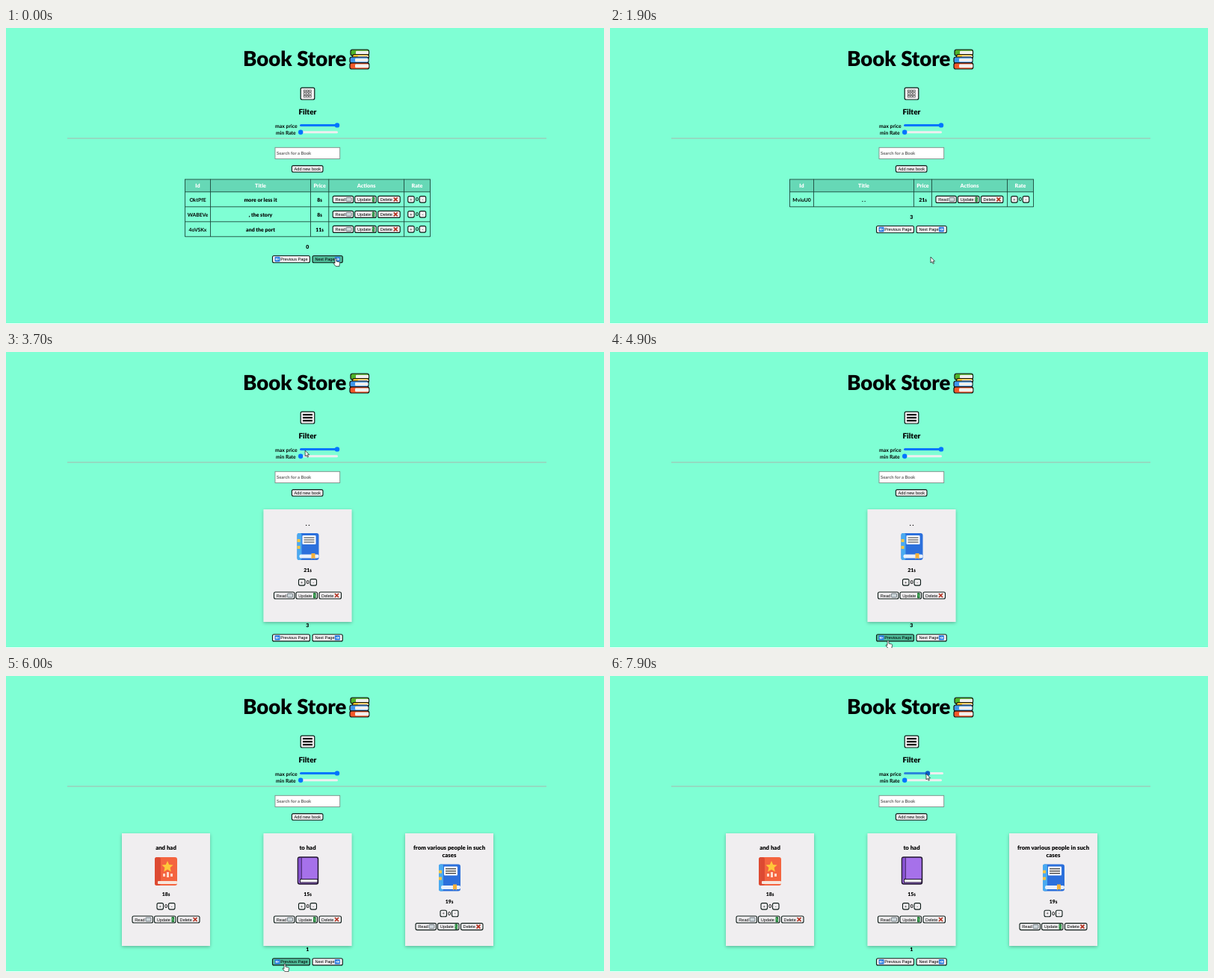
An HTML page for the animation above (8 s loop, 800 px wide and 397 px high).

```html
<!DOCTYPE html>
<html lang="en">
<head>
<meta charset="utf-8">
<title>Book Store</title>
<style>
  html, body { margin: 0; width: 100%; height: 100%; overflow: hidden; background: #7fffd4; }
  svg { display: block; width: 800px; height: 397px; }
  text { font-family: Lato, "Open Sans", sans-serif; font-weight: 700; white-space: pre; text-rendering: geometricPrecision; }
  .ui { font-family: "Liberation Sans", Arial, sans-serif; font-weight: 400; }
  .heavy { font-weight: 900; }
</style>
</head>
<body>
<svg id="stage" viewBox="0 0 800 397" xmlns="http://www.w3.org/2000/svg">
  <defs>
    <filter id="shadow" x="-10%" y="-10%" width="120%" height="120%">
      <feDropShadow dx="0" dy="1.5" stdDeviation="2" flood-opacity=".28"/>
    </filter>
  </defs>
  <g id="page"></g>
  <g id="cursor"></g>
</svg>
<script>
const LOOP = 8000;
const pageLayer = document.getElementById('page');
const cursorLayer = document.getElementById('cursor');

// id, title lines, price, cover
const books = [
  [['OktPfE', ['more or less it'], 8, 'red'], ['WABEVe', [', the story'], 8, 'purple'], ['4oVSKx', ['and the port'], 11, 'blue']],
  [['Tq8LnB', ['and had'], 18, 'red'], ['hX2mRd', ['to had'], 15, 'purple'], ['Jc6YvA', ['from various people in such', 'cases'], 19, 'blue']],
  [['R9Pbzw', ['was more or less'], 16, 'blue'], ['VgE7ej', ['to a dead channel'], 25, 'red'], ['D5sWEC', [', the story'], 8, 'purple']],
  [['MviuU0', ['. .'], 21, 'blue']]
];

// time, page, card view
const views = [[0, 0, 0], [400, 1, 0], [800, 2, 0], [1900, 3, 0], [3300, 3, 1], [5100, 2, 1], [6000, 1, 1]];
// time, x, y
const path = [
  [0, 440, 309], [900, 440, 309], [1150, 434, 267], [1200, 434, 267], [1400, 428, 304],
  [1600, 428, 305], [1700, 429, 307], [2000, 429, 307], [2750, 404, 100], [2900, 405, 86],
  [3500, 405, 86], [4300, 374, 380], [4500, 371, 387], [5200, 371, 387], [5500, 372, 386],
  [6600, 372, 386], [7350, 442, 132], [7500, 442, 131], [7900, 423, 131], [8000, 423, 131]
];

const rect = (x, y, w, h, fill, extra = '') =>
  `<rect x="${x}" y="${y}" width="${w}" height="${h}" fill="${fill}" ${extra}/>`;
const shape = (d, fill, extra = '') => `<path d="${d}" fill="${fill}" ${extra}/>`;
const stroke = (d, color, w = 1) => shape(d, 'none', `stroke="${color}" stroke-width="${w}"`);
const text = (x, y, s, size, { anchor = 'middle', fill = '#000', cls = '' } = {}) =>
  `<text x="${x}" y="${y}" font-size="${size}" text-anchor="${anchor}" fill="${fill}" class="${cls}">${s}</text>`;
const move = (x, y, body) => `<g transform="translate(${x} ${y})">${body}</g>`;
const label = (x, y, s) => text(x, y, s, 5.6, { anchor: 'start', cls: 'ui' });
const cost = (x, y, price) => text(x, y, price + '<tspan font-size="4.6">$</tspan>', 6.9, { cls: 'heavy' });
const box = (x, y, w, h, hot) =>
  rect(x, y, w, h, hot ? '#4fba98' : '#f0eef0', 'rx="2" stroke="#0c1a16" stroke-width="1.1"');

const inside = (p, x, y, w, h) => p.x >= x && p.x <= x + w && p.y >= y && p.y <= y + h;

function bookStack() {
  const layer = (x, y, w, h, color) =>
    rect(x, y, w, h, color, 'rx="2.5" stroke="#111" stroke-width="1.2"') +
    rect(x + 7, y + 1.7, w - 7.5, h - 3.4, '#f1f0ee', 'rx="1.2"');
  return layer(461, 29, 24.5, 8, '#4fb32a') + layer(463.5, 35.5, 22, 5.5, '#f8c32c') +
    layer(460, 39, 25, 8, '#3f97ec') + layer(460, 46.8, 25.8, 8.2, '#f4592a');
}

function cover(kind) {
  if (kind === 'red') {
    return rect(-15, 1, 30, 38, '#f4643f', 'rx="3"') + rect(-15, 1, 8, 38, '#dd4a32', 'rx="3"') +
      rect(-11, 33, 26, 4, '#f7e6dc', 'rx="1"') +
      shape('M2 6l2.2 5 5.4.5-4 3.6 1.2 5.3-4.8-2.8-4.8 2.8 1.2-5.3-4-3.6 5.4-.5z', '#ffc83a') +
      rect(-4, 23, 3, 4, '#ffd9c9') + rect(1, 21, 3, 7, '#ffd9c9') + rect(6, 23, 3, 4, '#ffd9c9');
  }
  if (kind === 'purple') {
    return rect(-13, 1, 27, 36, '#a671ea', 'rx="2.5" stroke="#20152e" stroke-width="1.5"') +
      rect(-12.3, 2, 4, 28, '#8551ce') + stroke('M-8 1.5V30', '#3a2356', .8) +
      rect(-10, 30.5, 23.4, 4.5, '#f4f0f6', 'stroke="#20152e" stroke-width="1"');
  }
  return rect(-14, 1, 29, 36, '#2c70dc', 'rx="3"') + rect(-14, 1, 6, 36, '#4aaaf0', 'rx="2"') +
    rect(-14, 9, 4, 4, '#f6c544') + rect(-14, 18, 4, 4, '#f6c544') +
    rect(-7, 4, 18, 12, '#fff', 'rx="1"') + stroke('M-5 7H9M-5 10H9M-5 13H9', '#333', 1.1) +
    rect(-11, 29.5, 26, 5, '#e9f1fc', 'rx="2"') + shape('M5 28h5v8l-2.5-2-2.5 2z', '#f6b13c');
}

function actions(x, y) {
  return box(x, y, 27.5, 9, 0) + label(x + 3.3, y + 6.6, 'Read') +
    rect(x + 18, y + 2, 7, 5, '#cfd8dc', 'rx=".6" stroke="#48545c" stroke-width=".7"') +
    box(x + 29.5, y, 28.5, 9, 0) + label(x + 32.8, y + 6.6, 'Update') +
    rect(x + 52.5, y + 1, 3.6, 7.2, '#17712f', 'rx="1"') +
    stroke(`M${x + 55.3} ${y + 2.8}h-2v1.7h2v1.8h-2`, '#7fe08c', .6) +
    box(x + 60.5, y, 29.5, 9, 0) + label(x + 63.6, y + 6.6, 'Delete') +
    stroke(`M${x + 81.5} ${y + 2}l5 5m0-5l-5 5`, '#b5301f', 1.7);
}

function rate(x, y) {
  return box(x, y, 8.5, 8.5, 0) + text(x + 4.25, y + 6.2, '+', 5.6, { cls: 'ui' }) +
    text(x + 12.2, y + 6.7, '0', 6.6) +
    box(x + 15.5, y, 8.5, 8.5, 0) + text(x + 19.75, y + 5.9, '-', 5.6, { cls: 'ui' });
}

function pager(n, y, p) {
  const arrow = (x, dir) => rect(x, y + 1.3, 7, 6.6, '#2f7fe0', 'rx=".8"') +
    stroke(`M${x + 1.3} ${y + 4.6}h4.4`, '#fff', 1) +
    stroke(`M${x + 3.5 + dir * .4} ${y + 2.9}l${dir * 1.7} 1.7l${-dir * 1.7} 1.7`, '#fff', .8);
  return text(403.3, y - 10, n, 7, { cls: 'heavy' }) +
    box(356.5, y, 50, 9.2, inside(p, 356, y, 51, 9.5)) + arrow(359.6, -1) + label(367.2, y + 6.7, 'Previous Page') +
    box(410, y, 40.3, 9.2, inside(p, 410, y, 41, 9.5)) + label(413.4, y + 6.7, 'Next Page') + arrow(439.8, 1);
}

function table(n, p) {
  const rows = books[n], small = rows.length === 1;
  const cols = small ? [240.5, 272.5, 406.5, 430.5, 531.5, 566.5] : [239.5, 273.5, 407.5, 431.8, 532.5, 567.5];
  const mid = cols.slice(1).map((c, i) => (c + cols[i]) / 2);
  const left = cols[0], width = cols[5] - left, bottom = 220 + rows.length * 20;
  let out = rect(left, 203, width, 17, '#66d8b6');
  ['Id', 'Title', 'Price', 'Actions', 'Rate'].forEach((s, i) =>
    out += text(mid[i], 214.2, s, 7.2, { fill: '#fff', cls: 'heavy' }));
  rows.forEach(([id, title, price], i) => {
    const y = 220 + i * 20;
    for (let c = 0; c < 5; c++) {
      if (inside(p, cols[c], y, cols[c + 1] - cols[c], 20)) out += rect(cols[c], y, cols[c + 1] - cols[c], 20, '#e6e4e6');
    }
    out += text(mid[0], y + 12.5, id, 6.8) + text(mid[1], y + 12.5, title.join(' '), 7, { cls: 'heavy' }) +
      cost(mid[2], y + 12.5, price) + actions(cols[3] + 5.4, y + 5.4) + rate(cols[4] + 5.2, y + 5.6);
  });
  let lines = cols.map(x => `M${x} 202.7V${bottom}`).join('') + `M${left} 203H${cols[5]}`;
  for (let y = 220; y <= bottom; y += 20) lines += `M${left} ${y - .2}H${cols[5]}`;
  return out + stroke(lines, '#1d4a3d', .9) + pager(n, bottom + 25.5, p);
}

function card(x, [, title, price, kind]) {
  const dy = (title.length - 1) * 9.6;
  let out = rect(-59, 211, 118, 151, '#f0eef0', 'filter="url(#shadow)"');
  title.forEach((s, i) => out += text(0, 232.8 + i * 9.8, s, 7.8, { cls: 'heavy' }));
  out += move(0, dy, move(0, 242, cover(kind)) + cost(0, 295.3, price) + rate(-12, 304.6) + actions(-45, 322));
  return move(x, 0, out);
}

function cards(n, p) {
  const xs = books[n].length === 1 ? [403.5] : [214, 403.5, 593];
  return books[n].map((b, i) => card(xs[i], b)).join('') + pager(n, 378.7, p);
}

function header(grid, p, value) {
  const hot = inside(p, 394, 80, 19, 16), drag = value < 443;
  let icon = '';
  if (grid) icon = stroke('M397 84.2H410M397 88.2H410M397 92.2H410', '#111', 2.3);
  else for (let i = 0; i < 9; i++) {
    icon += rect(398.5 + i % 3 * 3.6, 83.2 + (i / 3 | 0) * 3.6, 2.5, 2.5, 'none', 'stroke="#444" stroke-width=".7"');
  }
  const start = { anchor: 'start' };
  return text(317, 51, 'Book Store', 27.6, { anchor: 'start', cls: 'heavy' }) + bookStack() +
    rect(394.2, 80.2, 18.6, 15.8, hot ? '#4fba98' : '#f3f1f3', 'rx="2" stroke="#0c1a16" stroke-width="1.2"') + icon +
    text(403.4, 115.6, 'Filter', 10, { cls: 'heavy' }) +
    text(360, 133.8, 'max price', 6.9, start) + text(361, 142.8, 'min Rate', 6.8, start) +
    rect(393, 128.9, 53, 3, '#f0eef0', 'rx="1.5"') +
    rect(393, 128.9, value - 393, 3, drag ? '#2d87dc' : '#0075ff', 'rx="1.5"') +
    `<circle cx="${value}" cy="130.4" r="3.2" fill="${drag ? '#0a5cc4' : '#0075ff'}"/>` +
    rect(391, 138.2, 53, 3, '#f0eef0', 'rx="1.5"') + '<circle cx="394.2" cy="139.7" r="3.2" fill="#0075ff"/>' +
    rect(82, 147.5, 641, 1, '#a8b8b0') +
    rect(360, 160.3, 86.7, 15.2, '#fff', 'stroke="#7d8a85" stroke-width=".9"') +
    text(362, 170, 'Search for a Book', 5.9, { anchor: 'start', fill: '#666' }) +
    box(382.4, 184.6, 41.6, 8.6, 0) + label(385.6, 190.8, 'Add new book');
}

const hand = shape('M0 1q0-1.2 1-1.2t1 1.2v3l3.6.8q1.2.4 1 1.8l-.6 2.4v1.6H1.2L-1.7 7q-.5-1.3.6-1.3L0 6.5z',
  '#fff', 'stroke="#111" stroke-width=".7"');
const arrow = shape('M0 0V8l1.8-1.6 1.3 2.8 1.3-.6-1.3-2.7h2.4z', '#fff', 'stroke="#111" stroke-width=".7"');

function cursorAt(t) {
  const i = path.findIndex(k => k[0] > t);
  const [t0, x0, y0] = path[i - 1], [t1, x1, y1] = path[i];
  let u = (t - t0) / (t1 - t0);
  if (t < 7500) u = u * u * (3 - 2 * u);
  return { x: x0 + (x1 - x0) * u, y: y0 + (y1 - y0) * u };
}

let last = '';
function draw(now) {
  const t = Math.floor(now % LOOP / 100) * 100;
  const p = cursorAt(t);
  const [, n, grid] = views.filter(v => v[0] <= t).pop();
  const value = 443 - 18 * Math.min(1, Math.max(0, (t - 7500) / 400));
  const pagerY = grid ? 378.7 : 220 + books[n].length * 20 + 25.5;
  const onButton = inside(p, 356, pagerY, 51, 9.5) || inside(p, 410, pagerY, 41, 9.5) || inside(p, 394, 80, 19, 16);
  const html = rect(0, 0, 800, 396, '#7fffd4') + rect(0, 396, 800, 1, '#f6fffc') +
    header(grid, p, value) + (grid ? cards(n, p) : table(n, p));
  if (html !== last) pageLayer.innerHTML = last = html;
  if (cursorLayer.dataset.kind !== String(onButton)) {
    cursorLayer.innerHTML = onButton ? hand : arrow;
    cursorLayer.dataset.kind = onButton;
  }
  cursorLayer.setAttribute('transform', `translate(${p.x.toFixed(2)} ${p.y.toFixed(2)})`);
}

const begin = performance.now();
function tick() {
  draw(performance.now() - begin);
  requestAnimationFrame(tick);
}
tick();
</script>
</body>
</html>
```
